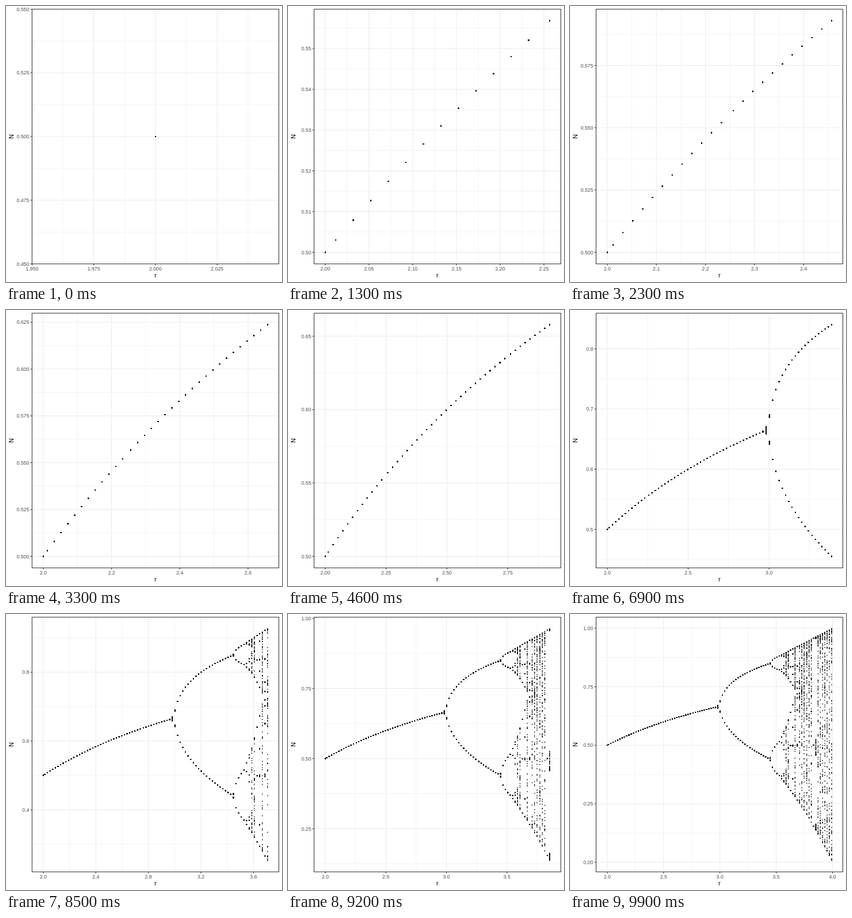
Animation of 480 by 480 pixels, one loop 10000 ms. Source, as an HTML page with a canvas:

```html
<!DOCTYPE html>
<html lang="en">
<head>
<meta charset="utf-8">
<title>Bifurcation diagram</title>
<style>
  html, body { margin: 0; width: 100%; height: 100%; overflow: hidden; background: #fff; }
  svg, canvas { position: absolute; left: 0; top: 0; width: 480px; height: 480px; }
  text { font: 8.8px "Liberation Sans", Arial, Helvetica, sans-serif; fill: #4d4d4d; }
  .title { font-size: 11px; fill: #000; text-anchor: middle; }
  path { fill: none; stroke-width: 1.07; }
  #minor, #major { stroke: #ebebeb; }
  #minor { stroke-width: .53; }
  #ticks, #border { stroke: #333; }
</style>
</head>
<body>
<svg viewBox="0 0 480 480">
  <path id="minor"/>
  <path id="major"/>
  <path id="border" d="M45.3 5.5H474.5V448.5H45.3Z"/>
  <path id="ticks"/>
  <g id="labels"></g>
  <text class="title" x="259.9" y="472.4">r</text>
  <text class="title" transform="translate(13.4 227) rotate(-90)">N</text>
</svg>
<canvas width="480" height="480"></canvas>
<script>
const FRAMES = 100, STEP_MS = 100, ROWS = 499;
const BURN = 100, KEEP = 100;
const LEFT = 45.3, RIGHT = 474.5, TOP = 5.5, BOTTOM = 448.5;
const DOT = 0.85;
const el = id => document.getElementById(id);
const ctx = document.querySelector('canvas').getContext('2d');

// Logistic map: one value of r per step, early iterations discarded
function column(k) {
  const row = k ? Math.ceil((k - 0.5) * ROWS / (FRAMES - 1)) : 0;
  const r = 2 + 2 * row / ROWS, values = [];
  let n = 0.5;
  for (let i = 1; i <= BURN + KEEP; i++) {
    n = r * n * (1 - n);
    if (i > BURN) values.push(n);
  }
  return { r, values };
}

const columns = Array.from({ length: FRAMES }, (_, k) => column(k));
let low = Infinity, high = -Infinity;
for (const c of columns) {
  c.low = low = Math.min(low, ...c.values);
  c.high = high = Math.max(high, ...c.values);
}

// Axis breaks by the extended Wilkinson search
function niceBreaks(min, max) {
  const Q = [1, 5, 2, 2.5, 4, 3], m = 5, range = max - min, eps = 1e-10;
  const score = (s, c, d) => 0.25 * s + 0.2 * c + 0.5 * d + 0.05;
  const cover = (a, b) => 1 - 0.5 * (a * a + b * b) / (0.1 * range) ** 2;
  let best = -2, found = null;
  for (let j = 1; j < 50; j++) {
    for (let qi = 0; qi < Q.length; qi++) {
      const q = Q[qi], simple = 1 - qi / (Q.length - 1) - j;
      if (score(simple + 1, 1, 1) < best) return found;
      for (let k = 2; k < 100; k++) {
        const dense = k >= m ? 2 - (k - 1) / (m - 1) : 1;
        if (score(simple + 1, 1, dense) < best) break;
        let z = Math.ceil(Math.log10(range / (k + 1) / j / q));
        for (let tries = 0; tries < 20; tries++, z++) {
          const step = j * q * 10 ** z, span = step * (k - 1);
          const half = Math.max(0, (span - range) / 2);
          if (score(simple + 1, cover(half, half), dense) < best) break;
          const first = Math.floor(max / step) * j - (k - 1) * j;
          const last = Math.ceil(min / step) * j;
          for (let start = first; start <= last; start++) {
            const a = start * step / j, b = a + span;
            const rest = ((a % step) + step) % step;
            const zero = (rest < eps || step - rest < eps) && a <= 0 && b >= 0 ? 1 : 0;
            const ratio = (k - 1) / span * (Math.max(b, max) - Math.min(a, min)) / (m - 1);
            const s = score(simple + zero, cover(max - b, min - a), 2 - Math.max(ratio, 1 / ratio));
            if (s > best) {
              best = s;
              found = { start: a, step, count: k };
            }
          }
        }
      }
    }
  }
  return found;
}

function makeAxis(min, max, p0, p1, flatCount) {
  const flat = max - min < 1e-9;
  const pad = flat ? 0.05 : (max - min) * 0.05;
  const lo = min - pad, hi = max + pad, tiny = 1e-9;
  const inside = v => v >= lo - tiny && v <= hi + tiny;
  const { start, step, count } = flat
    ? { start: lo, step: 0.025, count: flatCount } : niceBreaks(min, max);
  const all = Array.from({ length: count }, (_, i) => start + i * step);
  const major = all.filter(inside), minor = [];
  for (let i = 0; i <= major.length; i++) {
    const v = major[0] + (i - 0.5) * step;
    if (inside(v)) minor.push(v);
  }
  let digits = 0;
  while (digits < 6 && major.some(v => Math.abs(v - v.toFixed(digits)) > 1e-8)) digits++;
  const at = v => p0 + (v - lo) / (hi - lo) * (p1 - p0);
  return { major, minor, digits, at };
}

function gridPath(x, y, kind) {
  return x[kind].map(v => `M${x.at(v)} ${TOP}V${BOTTOM}`).join('') +
    y[kind].map(v => `M${LEFT} ${y.at(v)}H${RIGHT}`).join('');
}

function draw(k) {
  const last = columns[k];
  const x = makeAxis(2, last.r, LEFT, RIGHT, 4);
  const y = makeAxis(last.low, last.high, BOTTOM, TOP, 5);

  el('minor').setAttribute('d', gridPath(x, y, 'minor'));
  el('major').setAttribute('d', gridPath(x, y, 'major'));
  el('ticks').setAttribute('d',
    x.major.map(v => `M${x.at(v)} ${BOTTOM}v2.75`).join('') +
    y.major.map(v => `M${LEFT} ${y.at(v)}h-2.75`).join(''));
  el('labels').innerHTML =
    x.major.map(v => `<text x="${x.at(v)}" y="459.8" text-anchor="middle">${v.toFixed(x.digits)}</text>`).join('') +
    y.major.map(v => `<text x="40.4" y="${y.at(v) + 3.15}" text-anchor="end">${Math.abs(v).toFixed(y.digits)}</text>`).join('');

  ctx.clearRect(0, 0, 480, 480);
  for (const c of columns.slice(0, k + 1)) {
    const px = x.at(c.r);
    for (const n of c.values) {
      ctx.beginPath();
      ctx.arc(px, y.at(n), DOT, 0, 2 * Math.PI);
      ctx.fill();
    }
  }
}

let shown = -1;
function tick() {
  const k = Math.floor(performance.now() / STEP_MS) % FRAMES;
  if (k !== shown) draw(shown = k);
  requestAnimationFrame(tick);
}
tick();
</script>
</body>
</html>
```
